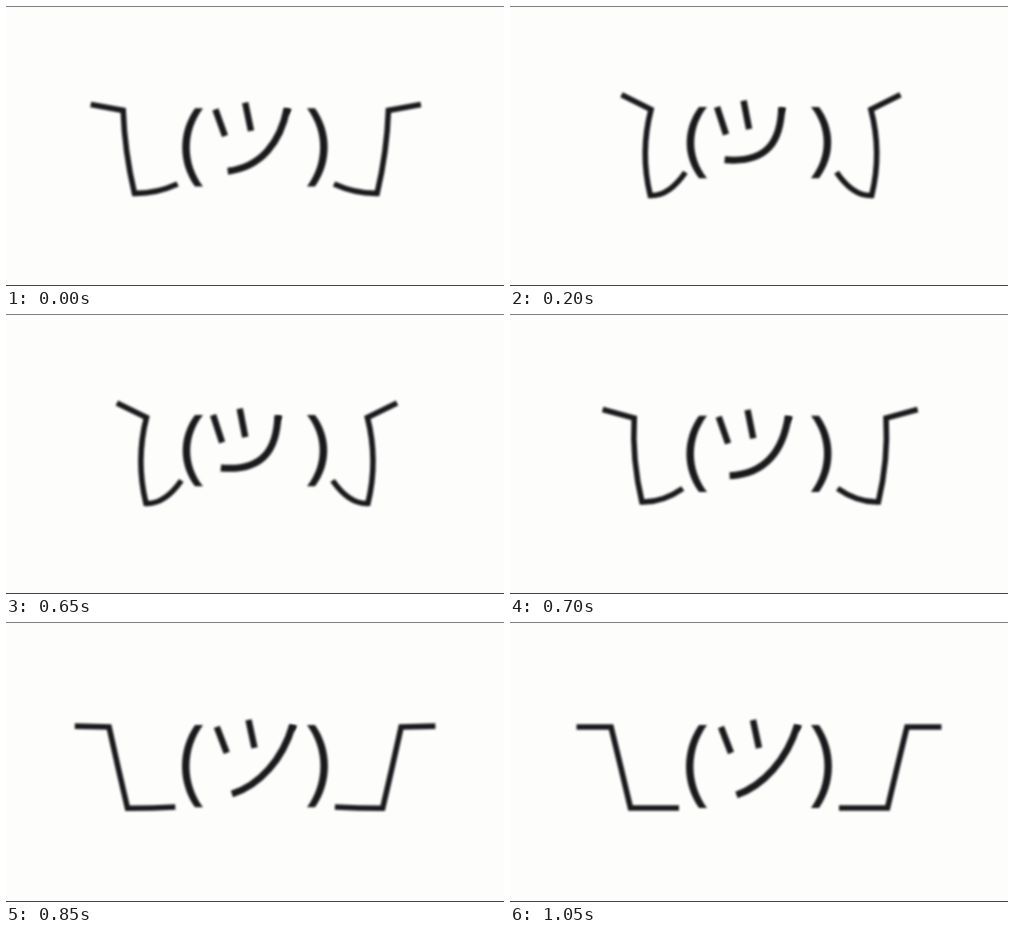
Recreate the animation shown at these times as an HTML page with a canvas. Size 498 px wide and 280 px high, loop 1250 ms.

```html
<!DOCTYPE html>
<html lang="en">
<head>
<meta charset="utf-8">
<title>Shrug</title>
<style>
  html, body { margin: 0; width: 100%; height: 100%; overflow: hidden; background: #fdfefc; }
  canvas { display: block; }
</style>
</head>
<body>
<canvas id="stage" width="498" height="280"></canvas>
<script>
const ctx = document.getElementById('stage').getContext('2d');
const LOOP = 1250;
const RELEASE = 645;
const INK = '#1b191c';

// The picture only changes at these times (ms)
const ticks = [0, 50, 200, 300, 650, 700, 750, 850, 900, 950, 1050];

// 0 is arms at rest, 1 is fully shrugged: a quick rise, a hold, a soft fall
function shrugAt(t) {
  return t < RELEASE
    ? 1 - 0.6 / (1 + t / 31.6) ** 2
    : Math.exp(-1.27 * ((t - RELEASE) / 105) ** 1.28);
}

function stroke(width, trace) {
  ctx.lineWidth = width;
  ctx.beginPath();
  trace();
  ctx.stroke();
}

function mirrored(drift, paint) {
  paint();
  ctx.save();
  ctx.translate(498 + drift, 0);
  ctx.scale(-1, 1);
  paint();
  ctx.restore();
}

function drawFigure(p) {
  // A point at rest plus the distance it travels in a full shrug
  const at = (x, y, dx, dy) => [x + dx * p, y + dy * p];

  const arm = () => stroke(5.6, () => {
    ctx.moveTo(...at(66.5, 105, 45.5, -16.5));
    ctx.lineTo(...at(101, 105, 40.5, -1.5));
    ctx.quadraticCurveTo(...at(111, 145.5, 19, 1), ...at(120.5, 186, 20, 3.5));
    ctx.quadraticCurveTo(...at(144, 186, 15, 4.5), ...at(169, 186, 6.5, -20));
  });

  const paren = () => {
    const top = 103 - 2 * p;
    const bottom = 186 - 14 * p;
    const bend = (bottom - top) * 0.3;
    ctx.beginPath();
    ctx.moveTo(189, top);
    ctx.bezierCurveTo(171.7 + p, top + bend, 171.7 + p, bottom - bend, 189, bottom);
    ctx.lineTo(197, bottom);
    ctx.bezierCurveTo(179 + p, bottom - bend, 179 + p, top + bend, 197, top);
    ctx.fill();
  };

  const eye = (from, to) => stroke(6.4, () => {
    ctx.moveTo(...from);
    ctx.lineTo(...to);
  });

  const smile = () => {
    const [x, y] = at(287.5, 103, -16, -1.5);
    stroke(7, () => {
      ctx.moveTo(x, y);
      ctx.bezierCurveTo(
        ...at(277, 138, -6.5, -4),
        ...at(253, 163.5, 5.5, -6),
        ...at(226.5, 173, -12, -19.5));
    });
    // pointed tip at the top of the stroke
    ctx.beginPath();
    ctx.moveTo(x - 3, y);
    ctx.lineTo(x + 4.5, y + 0.5);
    ctx.lineTo(x + 1, y + 7);
    ctx.fill();
  };

  mirrored(4 * p, arm);
  mirrored(0, paren);
  eye(at(211, 105, -4, -4), at(221, 131, -5, -2.5));
  eye(at(243, 98, -9.5, -3.5), at(249, 126, -10, -3));
  smile();
}

function draw(p) {
  ctx.filter = 'none';
  ctx.fillStyle = '#fdfefc';
  ctx.fillRect(0, 0, 498, 280);
  ctx.fillStyle = '#808080';
  ctx.fillRect(0, 0, 498, 1);
  ctx.fillStyle = '#444';
  ctx.fillRect(0, 279, 498, 1);

  ctx.filter = 'blur(0.8px)';
  ctx.fillStyle = ctx.strokeStyle = INK;
  drawFigure(p);
}

function frame() {
  const t = performance.now() % LOOP;
  draw(shrugAt(ticks.findLast(start => start <= t)));
  requestAnimationFrame(frame);
}
frame();
</script>
</body>
</html>
```
